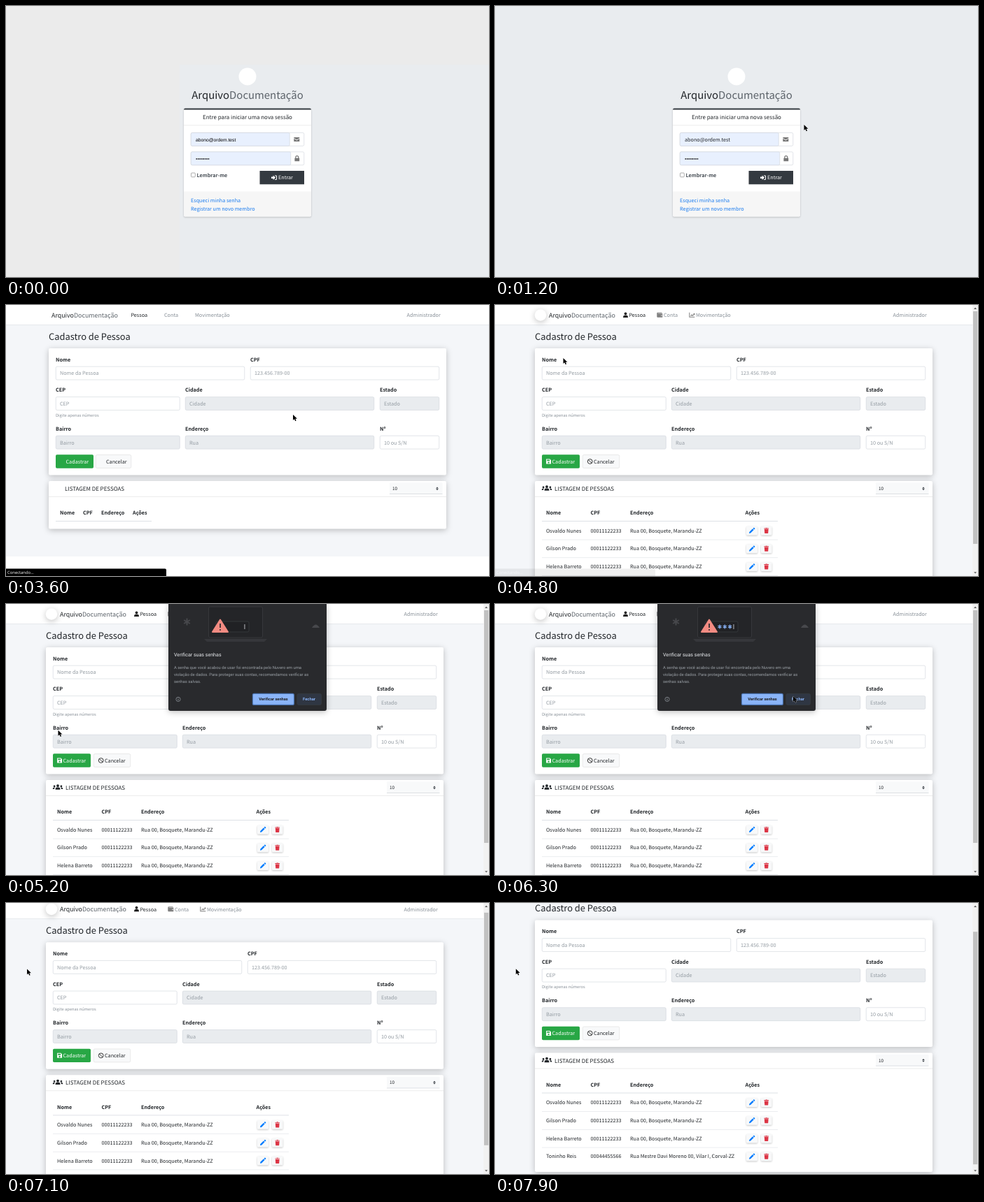
Recreate the animation shown at these times as an HTML page. Size 690 px wide and 388 px high, loop 8 s.

```html
<!DOCTYPE html>
<html lang="pt-BR">
<head>
<meta charset="utf-8">
<title>Cadastro de Pessoa</title>
<style>
html, body { margin: 0; height: 100%; overflow: hidden; background: #fff; }
svg { display: block; width: 100vw; height: 100vh; }
text {
  font-family: "Noto Sans CJK JP", "Noto Sans CJK SC", "Noto Sans CJK", "Noto Sans", sans-serif;
  fill: #212529; text-rendering: geometricPrecision; white-space: pre;
}
.b { font-weight: 700; }
.light { font-weight: 300; fill: #5c636a; }
.mute { fill: #868e96; }
.hint { fill: #939ba2; }
.white { fill: #fff; }
.link { fill: #1a7bee; }
.mid { text-anchor: middle; }
.ui { font-family: Roboto, sans-serif; fill: #9aa0a6; }
.arial { font-family: "Liberation Sans", sans-serif; fill: #000; }
.open { font-family: "Open Sans", sans-serif; fill: #fff; }
.card { filter: drop-shadow(0 2.5px 4px rgba(0,0,0,.24)); }
.soft { filter: drop-shadow(0 1px 1.2px rgba(0,0,0,.22)); }
</style>
</head>
<body>
<svg id="stage" viewBox="0 0 690 388" preserveAspectRatio="none"></svg>
<script>
const UNIT = 0.4522; // stage pixels per CSS pixel of the page's type
const BRAND = ['Arquivo', 'Documentação'];

const text = (x, y, s, size = 16, cls = '') =>
  `<text x="${x}" y="${y}" font-size="${size * UNIT}" class="${cls}">${s}</text>`;
const label = (x, y, s, px, cls) => text(x, y, s, px / UNIT, cls);
const rect = (x, y, w, h, fill, more = '') =>
  `<rect x="${x}" y="${y}" width="${w}" height="${h}" fill="${fill}" ${more}/>`;
const box = (x, y, w, h, fill, line = '#ced4da') =>
  rect(x + .25, y + .25, w - .5, h - .5, fill, `stroke="${line}" stroke-width=".6" rx="1.8"`);
const path = (d, fill, more = '') => `<path d="${d}" fill="${fill}" ${more}/>`;
const disc = (x, y, r, fill, more = '') => `<circle cx="${x}" cy="${y}" r="${r}" fill="${fill}" ${more}/>`;
const group = (s, more = '') => `<g ${more}>${s}</g>`;
const brand = (x, y, size, cls = '') =>
  text(x, y, `${BRAND[0]}<tspan class="light">${BRAND[1]}</tspan>`, size, cls);

const ICONS = {
  user: 'M0-3.7a1.9 1.9 0 0 1 0 3.8a1.9 1.9 0 0 1 0-3.8zM-3.4 3.7v-1a2.3 2.3 0 0 1 2.3-2.2h2.2a2.3 2.3 0 0 1 2.3 2.2v1z',
  side: 'M-4.9-3.4a1.4 1.4 0 0 1 0 2.8a1.4 1.4 0 0 1 0-2.8zM-7.2 2v-.8a1.5 1.5 0 0 1 1.5-1.5h1.5l-1 2.3z',
  wallet: 'M-4-2.5a1 1 0 0 1 1-1h6.2v.9h-5.8v.5h6.6v5.6h-7a1 1 0 0 1-1-1zM2 .2h1.2v1.2h-1.2z',
  chart: 'M-4-3.5h1v6h7v1h-8zM-2.2 1l2-2 1.2 1.2 1.6-1.6-.8-.8h2.4v2.4l-.8-.8-2.4 2.4-1.2-1.2-1.2 1.2z',
  save: 'M-3.5-3.5h5.3l1.7 1.7v5.3h-7zM-2.4-2.6v1.9h4v-1.9zM0 .4a1.2 1.2 0 0 0 0 2.4a1.2 1.2 0 0 0 0-2.4z',
  ban: 'M0-3.4a3.4 3.4 0 0 1 0 6.8a3.4 3.4 0 0 1 0-6.8zM-2.4-2.4l4.8 4.8',
  pencil: 'M-4 4l.4-2.1 4.6-4.6 1.7 1.7-4.6 4.6zM1.6-3.2l.8-.8q.5-.4 1 0l.7.7q.4.5 0 1l-.8.8z',
  trash: 'M-3.3-3.4h2l.5-.6h1.6l.5.6h2v.9h-6.6zM-2.9-1.9h5.8l-.4 5.5q0 .5-.6.5h-3.8q-.6 0-.6-.5z',
  mail: 'M-4-3h8v.9l-4 2.6-4-2.6zM-4-1.2l4 2.6 4-2.6v4.2h-8z',
  lock: 'M-3.4-.4h.8v-1.1a2.6 2.6 0 0 1 5.2 0v1.1h.8v4.4h-6.8zM-1.4-.4h2.8v-1.1a1.4 1.4 0 0 0-2.8 0z',
  enter: 'M-4-1.3h2.6v-2l3.4 3.3-3.4 3.3v-2h-2.6zM1-3.2h2q1 0 1 1v4.4q0 1-1 1h-2v-1h2v-4.4h-2z',
  sort: 'M0-2.4l1.8 2h-3.6zM0 2.4l1.8-2h-3.6z'
};
const icon = (name, x, y, fill, more = '') =>
  path(ICONS[name], fill, `fill-rule="evenodd" transform="translate(${x} ${y})" ${more}`);
const star = (x, y, r, color, w) => {
  const a = r * .87, b = r / 2;
  return path(`M${x} ${y - r}v${2 * r}M${x - a} ${y - b}l${2 * a} ${2 * b}M${x - a} ${y + b}l${2 * a} ${-2 * b}`,
    'none', `stroke="${color}" stroke-width="${w}"`);
};

function login() {
  let s = rect(0, 0, 690, 388, '#e9ecef')
    + path('M0 0H690V84H248V388H0z', '#ebebeb', 'id="stale"')
    + disc(345, 101, 12.5, '#fff')
    + brand(345, 132.5, 33, 'mid')
    + rect(254, 147, 182, 154.5, '#fff', 'rx="2" class="soft"')
    + path('M254 148.6v-.2q0-1.8 2-1.8h178q2 0 2 1.8v.2z', '#343a40')
    + rect(254, 170.6, 182, .6, '#dfdfdf')
    + text(345, 162.3, 'Entre para iniciar uma nova sessão', 17.6, 'mid')
    + box(264, 181.2, 162, 19.4, '#fff') + box(264, 181.2, 141.5, 19.4, '#e8f0fe')
    + box(264, 208.6, 162, 19.4, '#fff') + box(264, 208.6, 143, 19.4, '#e8f0fe')
    + icon('mail', 415.3, 191, '#777') + icon('lock', 415.8, 218.2, '#777')
    + group(label(271, 193.7, 'abono@ordem.test', 6.73, 'arial'), 'id="mailA"')
    + group(text(271, 193.9, 'abono@ordem.test'), 'id="mailB"');
  for (let i = 0; i < 8; i++) s += disc(272.3 + i * 2.45, 218.9, .95, '#222');
  return s
    + rect(264.5, 239, 5.8, 5.8, '#fff', 'rx="1" stroke="#767676" stroke-width=".6"')
    + text(272.5, 245, 'Lembrar-me', 16, 'b" style="fill:#495057')
    + rect(362.5, 236, 63.5, 19.3, '#343a40', 'id="enter"')
    + icon('enter', 383, 245.7, '#fff') + text(389, 248.4, 'Entrar', 16, 'white')
    + path('M254 265.4h182v34q0 2-2 2h-178q-2 0-2-2z', '#f6f6f6')
    + text(264, 280.6, 'Esqueci minha senha', 16, 'link')
    + text(264, 292.7, 'Registrar um novo membro', 16, 'link');
}

function field(x, y, w, name, hint, off) {
  return text(x, y - 7.2, name, 16, 'b') + box(x, y, w, 19.4, off ? '#e9ecef' : '#fff')
    + text(x + 6, y + 12.5, hint, 16, 'hint');
}

function nav(ready) {
  let s = rect(-10, 0, 710, 28, '#fff') + rect(-10, 28, 710, .6, '#dee2e6');
  if (ready) s += disc(65, 14.5, 8.3, '#fff', 'class="card"')
    + icon('user', 186.5, 14.2, '#1a1a1a') + icon('wallet', 235.3, 14.3, '#808080')
    + icon('chart', 281.3, 14.3, '#808080');
  const [a, b, c, d] = ready ? [77, 191.5, 241, 287] : [61, 174.5, 222, 266];
  return s + brand(a, 17.9, 19.6) + text(b, 17.3, 'Pessoa') + text(c, 17.3, 'Conta', 16, 'mute')
    + text(d, 17.3, 'Movimentação', 16, 'mute') + text(568.6, 17.3, 'Administrador', 16, 'mute');
}

function table(ready) {
  const cols = ready ? [73, 136.5, 193, 357.5] : [73, 106, 132, 177];
  const width = ready ? 337 : 137;
  let s = rect(67, 309, width, 1, '#dee2e6');
  ['Nome', 'CPF', 'Endereço', 'Ações'].forEach((h, i) => s += text(cols[i], 300.2, h, 16, 'b'));
  if (!ready) return s;
  const street = 'Rua 00, Bosquete, Marandu-ZZ';
  [['Osvaldo Nunes', '00011122233', street],
   ['Gilson Prado', '00011122233', street],
   ['Helena Barreto', '00011122233', street],
   ['Toninho Reis', '00044455566', 'Rua Mestre Davi Moreno 00, Vilar I, Corval-ZZ']
  ].forEach((row, i) => {
    const y = 323 + i * 25.75;
    row.forEach((v, j) => s += text(cols[j], y + 2.7, v));
    if (i) s += rect(67, y - 13, width, .6, '#dee2e6');
    s += rect(359, y - 6.3, 16, 12.8, '#f8f9fa', 'rx="1.5" class="soft"') + icon('pencil', 367, y, '#007bff')
      + rect(380, y - 6.3, 15.5, 12.8, '#f8f9fa', 'rx="1.5" class="soft"') + icon('trash', 387.7, y, '#dc3545');
  });
  return s;
}

function page(ready) {
  let s = rect(-10, 0, 710, ready ? 440 : 360, '#f4f6f9') + nav(ready)
    + text(57, 49.9, 'Cadastro de Pessoa', 28.5)
    + rect(57, 62, 568, 181.5, '#fff', 'rx="2" class="card"')
    + field(67, 87.9, 270, 'Nome', 'Nome da Pessoa')
    + field(345, 87.9, 270, 'CPF', '123.456.789-00')
    + field(67, 131.4, 177.5, 'CEP', 'CEP')
    + field(252, 131.4, 270, 'Cidade', 'Cidade', true)
    + field(530, 131.4, 85, 'Estado', 'Estado', true)
    + text(67, 159.7, 'Digite apenas números', 12.8, 'mute')
    + field(67, 187, 177.5, 'Bairro', 'Bairro', true)
    + field(252, 187, 270, 'Endereço', 'Rua', true)
    + field(530, 187, 85, 'Nº', '10 ou S/N')
    + rect(67, 214.3, 54, 19.4, '#28a745', 'rx="1.8"') + text(81.5, 226.9, 'Cadastrar', 16, 'white')
    + box(ready ? 125 : 124, 214.3, ready ? 53 : 51, 19.4, '#f8f9fa', '#ddd')
    + text(ready ? 141 : 139, 226.9, 'Cancelar')
    + rect(57, 252, 568, ready ? 170.5 : 68.5, '#fff', 'rx="2" class="card"')
    + rect(57, 274.2, 568, .6, '#dfdfdf')
    + text(ready ? 85 : 80, 266, 'LISTAGEM DE PESSOAS', 17.6)
    + rect(544, 254.3, 75.5, 16.4, '#f8f9fa', 'rx="1"') + rect(544, 270.2, 75.5, .8, '#d5dade')
    + text(548, 265, '10', 14) + icon('sort', 612, 262.8, '#343a40')
    + table(ready);
  if (ready) s += icon('save', 76.6, 224, '#fff')
    + icon('ban', 135.7, 224, 'none', 'stroke="#333" stroke-width="1"')
    + icon('user', 74, 262, '#212529') + icon('side', 74, 263, '#212529')
    + group(icon('side', 0, 0, '#212529'), 'transform="translate(74 263) scale(-1 1)"');
  return s;
}

function scrollbar() {
  return rect(682.3, 0, 7.7, 388, '#f1f1f1') + rect(683, 9, 6.2, 333, '#c1c1c1', 'id="thumb"')
    + path('M686.1 3.6l2 2.4h-4zM686.1 384.6l2-2.4h-4z', '#606060');
}

function dialog() {
  let s = path('M232 0H458V150q0 3-3 3H235q-3 0-3-3z', '#292a2d', 'class="card"')
    + star(258.5, 25.5, 5, '#47484c', 2)
    + rect(289.5, 4, 77, 44, '#242528', 'rx="2" stroke="#36373b"') + path('M283 50h90l-4 4h-82z', '#36373b')
    + path('M437 34q5.500-9 11 0z', '#47484c')
    + rect(300, 25, 47, 15, '#202124', 'rx="2" stroke="#3c4043" stroke-width=".7"')
    + path('M306 22.500L317 40H295z', '#f28b82', 'stroke="#f28b82" stroke-width="2" stroke-linejoin="round"')
    + rect(305.2, 28, 1.7, 6, '#292a2d') + disc(306, 37, 1, '#292a2d');
  for (let i = 0; i < 3; i++) s += group(star(321 + i * 7.3, 32.5, 2.9, '#8ab4f8', 1.3), 'class="typed"');
  return s + rect(340.5, 29, .9, 7, '#c8cacd')
    + label(240, 75.2, 'Verificar suas senhas', 7.1, 'ui" style="fill:#e8eaed')
    + label(240, 92.8, 'A senha que você acabou de usar foi encontrada pelo Nuvero em uma', 5.86, 'ui')
    + label(240, 102.9, 'violação de dados. Para proteger suas contas, recomendamos verificar as', 5.86, 'ui')
    + label(240, 113, 'senhas salvas.', 5.86, 'ui')
    + disc(246, 136.4, 3.1, 'none', 'stroke="#9aa0a6" stroke-width=".7"') + rect(245.6, 135.9, .8, 2.2, '#9aa0a6')
    + rect(245.6, 134.5, .8, .8, '#9aa0a6')
    + rect(352.4, 128.4, 59, 16, '#8ab4f8', 'rx="2" stroke="#4d76b3" stroke-width="1.2"')
    + label(382, 138.4, 'Verificar senhas', 5.7, 'ui mid b" style="fill:#202124')
    + rect(416, 128.4, 34.5, 16, '#2f3643', 'rx="2" stroke="#3c4043" stroke-width=".6"')
    + label(433, 138.4, 'Fechar', 5.8, 'ui mid b" style="fill:#8ab4f8');
}

const stage = document.getElementById('stage');
stage.innerHTML = group(login(), 'id="login"')
  + group(page(false), 'id="bare" transform="translate(4)"')
  + group(page(true), 'id="full"')
  + group(scrollbar(), 'id="bar"')
  + group(path('M0 377.500H227q2 0 2 2V388H0z', '#000') + label(2, 384.9, 'Conectando...', 5.9, 'open'), 'id="status"')
  + group(dialog(), 'id="dialog"')
  + path('M0 0v8l1.900-1.700 1.300 2.900 1.400-.6-1.300-2.800h2.600z', '#000',
    'id="cursor" stroke="#fff" stroke-width=".5" paint-order="stroke"');

const $ = id => document.getElementById(id);
const show = (el, on) => el.style.display = on ? '' : 'none';
const typed = document.querySelectorAll('.typed');
const smooth = u => (u = Math.min(1, Math.max(0, u)), u * u * (3 - 2 * u));

// time, x, y of the pointer
const TRACK = [[600, 516, 77], [750, 516, 77], [1600, 379, 248], [1750, 379, 248], [2200, 410, 157],
  [4000, 410, 157], [4750, 97.5, 76], [4900, 97.5, 76], [5600, 39, 342], [6200, 426, 132],
  [6400, 426, 132], [7000, 30.3, 94.8], [7200, 29.8, 94.3]];

function pointer(t) {
  const i = TRACK.findIndex(k => k[0] > t);
  if (i < 1) return TRACK[i < 0 ? TRACK.length - 1 : 0].slice(1);
  const [t0, x0, y0] = TRACK[i - 1], [t1, x1, y1] = TRACK[i], u = smooth((t - t0) / (t1 - t0));
  return [x0 + (x1 - x0) * u, y0 + (y1 - y0) * u];
}

function draw(t) {
  const ready = t >= 4100;
  show($('login'), t < 3600);
  show($('stale'), t < 100);
  show($('mailA'), t < 200);
  show($('mailB'), t >= 200);
  $('enter').setAttribute('fill', t < 1500 ? '#343a40' : t < 1800 ? '#23272b' : '#1d2124');
  show($('bare'), t >= 3600 && !ready);
  show($('full'), ready);
  show($('bar'), ready);
  show($('status'), t >= 1900 && t < 4900);
  $('status').style.opacity = Math.min(1, 1 - (t - 4400) / 425);
  show($('dialog'), t >= 5100 && t < 6500);
  typed.forEach((el, i) => show(el, t >= 5400 + i * 200));

  const scroll = 43 * smooth((t - 7012) / 388) - (t >= 7900 ? 5.5 : 0);
  $('full').setAttribute('transform', `translate(0 ${-scroll})`);
  $('thumb').setAttribute('y', 9 + scroll * 370 / 431);

  show($('cursor'), t >= 600);
  $('cursor').setAttribute('transform', `translate(${pointer(t)})`);
}

function tick() {
  draw(Math.floor(performance.now() % 8000 / 100) * 100);
  requestAnimationFrame(tick);
}
tick();
</script>
</body>
</html>
```
